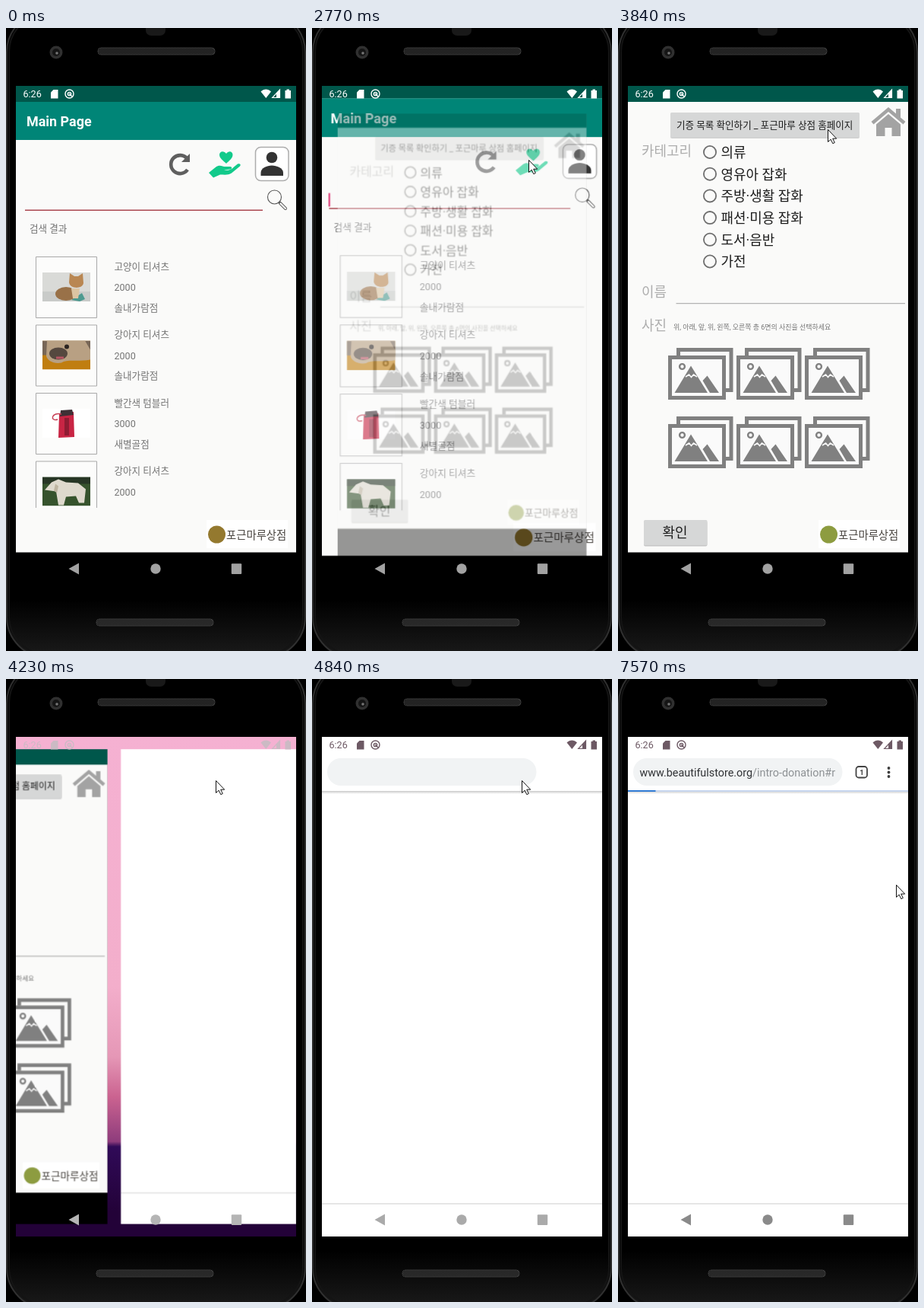
Recreate the animation shown at these times as an HTML page. Size 395 px wide and 818 px high, loop 8 s.

```html
<!DOCTYPE html>
<html lang="ko">
<head>
<meta charset="utf-8">
<title>Phone demo</title>
<style>
html, body { margin: 0; width: 100%; height: 100%; overflow: hidden; background: #000; }
svg { display: block; width: 395px; height: 818px; }
text { font: 12.57px Roboto, "Noto Sans CJK KR", "Noto Sans CJK", "Noto Sans", sans-serif; fill: #747474; white-space: pre; }
.big { font-size: 17.95px; }
.mid { font-size: 14.36px; }
.small { font-size: 8.97px; }
.dark { fill: #1c1c1c; }
.pale { fill: #adadad; }

.a { animation: 8s step-end infinite; }
.win { transform-origin: 197.5px 404px; }
.caret { animation-name: caret; }
.main { animation-name: main; }
.form { animation-name: form; }
.wall { animation-name: wall; }
.web { animation-name: web; }
.bar { animation-name: bar; }
.hint { animation-name: hint; }
.tools { animation-name: tools; }
.url { animation-name: url; }
.load { animation-name: load; transform-origin: 13px 0; }
.status { animation-name: status; }
.nav { animation-name: nav; }
.ripple { animation-name: ripple; transform-origin: 277px 134px; }
.lift { animation-name: lift; }
.mouse { animation-name: mouse; }

@keyframes caret {
  0%, 11.5%, 23.875% { opacity: 0; }
  4.625%, 18.125%, 30.75% { opacity: 1; }
}
@keyframes main {
  0% { transform: none; opacity: 1; }
  34.625% { transform: scale(1.015); opacity: 1; }
  35.563% { transform: scale(1.04); opacity: 1; }
  36.5% { transform: scale(1.047); opacity: 1; }
  37.438% { transform: scale(1.05); opacity: 1; }
  38.375%, 100% { opacity: 0; }
}
@keyframes form {
  0% { opacity: 0; transform: scale(.85); }
  34.625% { opacity: .4; transform: scale(.89); }
  35.563% { opacity: 1; transform: scale(.97); }
  36.5% { opacity: 1; transform: scale(.99); }
  37.438% { opacity: 1; transform: scale(.996); }
  38.375% { opacity: 1; transform: none; }
  51.875% { opacity: 1; transform: translate(-74px) scale(.97); }
  52.834% { opacity: 1; transform: translate(-239px) scale(.95); }
  53.79% { opacity: 1; transform: translate(-324px) scale(.95); }
  54.75% { opacity: 1; transform: translate(-353px) scale(.95); }
  55.625%, 100% { opacity: 0; }
}
@keyframes wall {
  0% { opacity: 0; }
  51.875%, 100% { opacity: 1; }
}
@keyframes web {
  0% { opacity: 0; }
  51.875% { opacity: 1; transform: translate(294px) scale(.97); }
  52.834% { opacity: 1; transform: translate(129px) scale(.95); }
  53.79% { opacity: 1; transform: translate(44px) scale(.95); }
  54.75% { opacity: 1; transform: translate(15px) scale(.95); }
  55.625% { opacity: 1; transform: translate(4px) scale(.957); }
  56.68% { opacity: 1; transform: scale(.987); }
  57.625%, 100% { opacity: 1; transform: none; }
}
@keyframes bar {
  0% { opacity: 0; }
  57.625%, 100% { opacity: 1; }
}
@keyframes hint {
  0% { opacity: 0; }
  66.75% { opacity: .5; }
  68.375% { opacity: 1; }
  90.77%, 100% { opacity: 0; }
}
@keyframes tools {
  0% { opacity: 0; }
  66.75% { opacity: .5; }
  68.375%, 100% { opacity: 1; }
}
@keyframes url {
  0% { opacity: 0; }
  90.77%, 100% { opacity: 1; }
}
@keyframes load {
  0% { transform: scaleX(0); }
  91.73% { transform: scaleX(.25); }
  92.7% { transform: scaleX(.5); }
  93.66% { transform: scaleX(.75); }
  94.625%, 100% { transform: none; }
}
@keyframes status {
  0% { color: #fff; }
  51.875% { color: #ccbac4; }
  53.79% { color: #b5a0ab; }
  55.625% { color: #947f8a; }
  57.625%, 100% { color: #6d5964; }
}
@keyframes nav {
  0% { color: #a2a2a2; }
  51.875% { color: #b5b5b5; }
  60.5% { color: #aaa; }
  61.5% { color: #a0a0a0; }
  62.5% { color: #969696; }
  63.5% { color: #8e8e8e; }
  73.25%, 100% { color: #8a8a8a; }
}
@keyframes ripple {
  0% { opacity: 0; transform: scale(.2); }
  45.125% { opacity: .1; transform: scale(.35); }
  46.083% { opacity: .1; transform: scale(.75); }
  47.04% { opacity: .06; transform: none; }
  48%, 100% { opacity: 0; }
}
@keyframes lift {
  0%, 48% { opacity: 0; }
  45.125% { opacity: .1; }
  46.083% { opacity: .16; }
  47.04% { opacity: .1; }
}
@keyframes mouse {
  0% { transform: translate(420px, 840px); }
  7.375% { transform: translate(385px, 776px); }
  8.36% { transform: translate(371px, 695px); }
  9.344% { transform: translate(353px, 590px); }
  10.328% { transform: translate(335px, 482px); }
  11.313% { transform: translate(318px, 382px); }
  12.297% { transform: translate(304px, 298px); }
  13.281% { transform: translate(294px, 232px); }
  14.266% { transform: translate(288px, 190px); }
  15.25% { transform: translate(285px, 173px); }
  40.5% { transform: translate(283px, 162px); }
  41.375% { transform: translate(279px, 143px); }
  42.25% { transform: translate(276px, 133px); }
  87.875% { transform: translate(281px, 141px); }
  88.84% { transform: translate(293px, 160px); }
  89.8% { transform: translate(310px, 187px); }
  90.77% { transform: translate(328px, 215px); }
  91.73% { transform: translate(344px, 240px); }
  92.7% { transform: translate(356px, 257px); }
  93.66% { transform: translate(363px, 266px); }
  94.625%, 100% { transform: translate(366px, 270px); }
}
</style>
</head>
<body>
<svg viewBox="0 0 395 818">
  <defs>
    <clipPath id="screen"><path d="M13 76h369v656H13z"/></clipPath>
    <clipPath id="list"><path d="M30 290h340v340H30z"/></clipPath>
    <clipPath id="button"><rect x="69" y="111" width="249" height="32.5" rx="1.5"/></clipPath>
    <clipPath id="pic"><path d="M48 321h63v38H48z"/></clipPath>
    <linearGradient id="body" x2="0" y2="1">
      <stop offset=".91" stop-color="#000"/><stop offset="1" stop-color="#1b1b1b"/>
    </linearGradient>
    <linearGradient id="sky" x2="0" y2="1">
      <stop offset="0" stop-color="#f5b1d2"/><stop offset=".5" stop-color="#f3aecb"/>
      <stop offset=".64" stop-color="#e597b6"/><stop offset=".72" stop-color="#cb6390"/>
      <stop offset=".81" stop-color="#8e3c7c"/><stop offset=".82" stop-color="#300a58"/>
      <stop offset=".95" stop-color="#230238"/>
    </linearGradient>
    <linearGradient id="shade" x2="0" y2="1">
      <stop stop-color="#c8c8c8"/><stop offset="1" stop-color="#fff"/>
    </linearGradient>
    <pattern id="mesh" width="2" height="2" patternUnits="userSpaceOnUse">
      <path d="M0 0h1v1H0zM1 1h1v1H1z" fill="#464646"/>
    </pattern>
    <rect id="grille" width="154" height="9" rx="4" fill="url(#mesh)" stroke="#383838"/>
    <circle id="radio" cx="121" cy="163" r="8.1" fill="none" stroke="#6e6e6e" stroke-width="1.8"/>
    <g id="photo" fill="none" stroke="#808080" stroke-width="5">
      <path d="M13.5 11V3.500h69.500v53H74"/>
      <path fill="#fafafa" d="M2.500 13.500h71v53h-71z"/>
      <circle cx="18.500" cy="25.500" r="3.400" stroke-width="2.400"/>
      <path d="M8.500 60 30 24.500 52 60zM45.500 44l6-6.500L67 60H55z" fill="#808080" stroke="none"/>
      <path d="m23 39 4.500-3 3 3.500 3-3.500 4.500 3" stroke="#fafafa" stroke-width="1.600"/>
    </g>
    <path id="frame" d="M39.500 300.500h80v80h-80z" fill="#fcfcfb" stroke="#a9a9a9"/>
    <g id="sign">
      <path d="M264 646h107v37H264z" fill="#fff"/>
      <circle cx="277.500" cy="665" r="11.500" fill="currentColor"/>
      <text class="mid" x="290" y="670.500" style="fill:#494540">포근마루상점</text>
    </g>
    <g id="base">
      <path d="M13 76h369v656H13z"/>
      <path d="M13 76h369v612.500H13z" fill="#fafaf9"/>
      <path d="M13 76h369v21H13z" fill="#00574b"/>
    </g>
  </defs>

  <!-- phone -->
  <path d="M0 0h395v818H0z"/>
  <rect x="1" y="-22" width="393" height="849" rx="54" fill="url(#body)" stroke="#303030" stroke-width="2"/>
  <rect x="4" y="-19" width="387" height="842" rx="51" fill="none" stroke="#141414" stroke-width="2"/>
  <rect x="184" y="-8" width="26" height="18" rx="7" fill="#191919"/>
  <circle cx="66" cy="32" r="8.500" fill="#303030"/>
  <circle cx="66" cy="32" r="5" fill="#151515"/>
  <circle cx="67" cy="33" r="1.800" fill="#777"/>
  <use href="#grille" x="121" y="26"/>
  <use href="#grille" x="119" y="776"/>

  <g clip-path="url(#screen)">
    <path d="M13 76h369v656H13z"/>
    <path class="a wall" d="M13 76h369v656H13z" fill="url(#sky)"/>

    <!-- list page -->
    <g class="a win main">
      <use href="#base"/>
      <path d="M13 97h369v50H13z" fill="#008577"/>
      <text class="big" x="27" y="129" style="fill:#fff;font-weight:600">Main Page</text>
      <path d="M238.500 171.500a12 12 0 1 0 .5 14.500" fill="none" stroke="#5f5f5f" stroke-width="4.600"/>
      <path d="M242 165v11h-11z" fill="#5f5f5f"/>
      <g fill="#12ca8b">
        <path d="M290 178c-4-4-9-7-9-11.500 0-5 6-6 9-1.500 3-4.500 8.500-3.500 8.500 1.500 0 4.500-4.500 7.500-8.500 11.500z"/>
        <path d="m267 190 10-8c5-3 8 0 12 0h6c3 0 3 3 0 3.500l-8 1c7 1 10-1 13-4l5-4c2-1 5 0 3 3l-11 9c-4 3-10 2-15 2l-9 4z"/>
      </g>
      <rect x="328.500" y="156.500" width="43.500" height="44" rx="7" fill="#fff" stroke="#adadad" stroke-width="1.500"/>
      <circle cx="350" cy="170" r="7.300" fill="#333"/>
      <path d="M335.500 194v-4c0-6 8-9.500 14.500-9.500s15 3.500 15 9.500v4z" fill="#333"/>
      <g fill="none" stroke="#555">
        <circle cx="353.500" cy="222" r="9" stroke-width="1.100"/>
        <path d="m360.500 229.500 7.500 7.500" stroke-width="4" stroke-linecap="round"/>
        <path d="m361.500 230.500 6.500 6.500" stroke="#fafafa" stroke-width="2.300" stroke-linecap="round"/>
      </g>
      <path d="M25 239.200h313" stroke="#ab4750" stroke-width="1.500"/>
      <path class="a caret" d="M24.500 219.500h1.800v17.500h-1.800z" fill="#d81b60"/>
      <text x="31" y="268">검색 결과</text>

      <g clip-path="url(#list)">
        <g>
          <use href="#frame"/>
          <g clip-path="url(#pic)">
            <path d="M48 321h63v38H48z" fill="#d9dad7"/>
            <path d="M48 346h63v13H48z" fill="#c9cbc9"/>
            <path d="m86 357 14-9 4 8-7 3z" fill="#4d9a90"/>
            <ellipse cx="79" cy="349" rx="14" ry="9" fill="#997148"/>
            <path d="m83 334 1-12 6 4h5l6-4 1 13c-1 8-18 8-19-1z" fill="#b98752"/>
            <path d="M86 342h11l-2 13h-7z" fill="#dcc5a2"/>
          </g>
          <text x="142.500" y="317.500">고양이 티셔츠</text>
          <text x="142.500" y="345">2000</text>
          <text x="142.500" y="371.500">솔내가람점</text>
        </g>
        <g transform="translate(0 89.500)">
          <use href="#frame"/>
          <g clip-path="url(#pic)">
            <path d="M48 321h63v38H48z" fill="#c07e10"/>
            <path d="M48 321h63v19H48z" fill="#776657"/>
            <path d="M54 321h50l7 12v13c-18 3-31-1-38 4-10 2-19-3-20-9z" fill="#b8a083"/>
            <ellipse cx="69" cy="338" rx="12" ry="8" fill="#55483f"/>
            <path d="M66 342h10v3H66z" fill="#b65563"/>
            <circle cx="80" cy="329" r="3" fill="#2c2522"/>
          </g>
          <text x="142.500" y="317.500">강아지 티셔츠</text>
          <text x="142.500" y="345">2000</text>
          <text x="142.500" y="371.500">솔내가람점</text>
        </g>
        <g transform="translate(0 179)">
          <use href="#frame"/>
          <path d="M48 321h63v38H48z" fill="#fff"/>
          <path d="m70 327 19-2 1 33-21 1z" fill="#c82544"/>
          <path d="m72 323 15-1 2 7-18 2z" fill="#3e3035"/>
          <path d="M77 333h6v23h-6z" fill="#8f1c33"/>
          <path d="M73 328c-14-3-15 10-5 7" fill="none" stroke="#c84257" stroke-width="1.500"/>
          <text x="142.500" y="317.500">빨간색 텀블러</text>
          <text x="142.500" y="345">3000</text>
          <text x="142.500" y="371.500">새별골점</text>
        </g>
        <g transform="translate(0 268.500)">
          <use href="#frame"/>
          <g clip-path="url(#pic)">
            <path d="M48 321h63v38H48z" fill="#36532d"/>
            <path d="M48 321h63v9H48z" fill="#273625"/>
            <path d="m60 328 9-4 10 4 16 1 10 8-2 18h-7l-4-9-13 1-3 11h-7l-3-18-15-2z" fill="#ded9cd"/>
            <path d="m65 330 4 3-2 9-4-3z" fill="#beb5a1"/>
          </g>
          <text x="142.500" y="317.500">강아지 티셔츠</text>
          <text x="142.500" y="345">2000</text>
        </g>
      </g>
      <use href="#sign" color="#94792f"/>
    </g>

    <!-- donation form -->
    <g class="a win form">
      <use href="#base"/>
      <rect class="a lift" x="70" y="114" width="248" height="34" rx="3"/>
      <rect x="69" y="112" width="249" height="33" rx="2" fill="#d0d0d0"/>
      <rect x="69" y="111" width="249" height="32.500" rx="1.500" fill="#d6d7d7"/>
      <g clip-path="url(#button)"><circle class="a ripple" cx="277" cy="134" r="215"/></g>
      <text class="dark" x="77" y="131.800">기증 목록 확인하기 _ 포근마루 상점 홈페이지</text>
      <g fill="#a3a3a3">
        <path d="m356 104 22.500 19-3 3.500L356 110l-19.500 16.500-3-3.500z"/>
        <path d="M366 106h6v13l-6-5zM356 113l16 13.500V142h-11.500v-11h-9v11H340v-15.500z"/>
      </g>
      <text class="big pale" x="31" y="168">카테고리</text>
      <use href="#radio"/><use href="#radio" y="28.700"/><use href="#radio" y="57.400"/>
      <use href="#radio" y="86.100"/><use href="#radio" y="114.800"/><use href="#radio" y="143.500"/>
      <text class="big dark" x="135.500" y="169.800">의류</text>
      <text class="big dark" x="135.500" y="198.500">영유아 잡화</text>
      <text class="big dark" x="135.500" y="227.200">주방·생활 잡화</text>
      <text class="big dark" x="135.500" y="255.900">패션·미용 잡화</text>
      <text class="big dark" x="135.500" y="284.600">도서·음반</text>
      <text class="big dark" x="135.500" y="313.300">가전</text>
      <text class="big pale" x="31" y="352.500">이름</text>
      <path d="M76.500 361.700H378" stroke="#b3b3b3" stroke-width="1.300"/>
      <text class="big pale" x="31" y="396.500">사진</text>
      <text class="small" x="73" y="396">위, 아래, 앞, 위, 왼쪽, 오른쪽 총 6면의 사진을 선택하세요</text>
      <use href="#photo" x="66" y="419"/><use href="#photo" x="156" y="419"/><use href="#photo" x="246" y="419"/>
      <use href="#photo" x="66" y="509"/><use href="#photo" x="156" y="509"/><use href="#photo" x="246" y="509"/>
      <rect x="34" y="647.500" width="83.500" height="33" rx="2" fill="#c6c6c6"/>
      <rect x="34" y="646" width="83.500" height="33" rx="1.500" fill="#d6d7d7"/>
      <text class="big dark" x="58.500" y="669">확인</text>
      <use href="#sign" color="#8d9c40"/>
    </g>

    <!-- browser -->
    <g class="a win web">
      <path d="M13 76h369v656H13z" fill="#fff"/>
      <path d="M13 689h369" stroke="#dedede" stroke-width="1.300"/>
      <g class="a bar">
        <path d="M13 147h369v4H13z" fill="url(#shade)"/>
        <rect x="20" y="104" width="275.500" height="36" rx="18" fill="#f1f3f4"/>
      </g>
      <text class="a hint mid" x="28.500" y="127.500" style="fill:#6b6f72">웹 주소 검색 또는 입력</text>
      <g class="a tools">
        <rect x="313.500" y="115" width="14.500" height="14.500" rx="3.500" fill="none" stroke="#444" stroke-width="1.800"/>
        <g fill="#3f3f3f"><circle cx="356.500" cy="117" r="1.900"/><circle cx="356.500" cy="122.500" r="1.900"/><circle cx="356.500" cy="128" r="1.900"/></g>
      </g>
      <g class="a url">
        <text class="mid" x="28.500" y="128" style="fill:#303235">www.beautifulstore.org<tspan fill="#8d9194">/intro-donation#r</tspan></text>
        <text x="318.300" y="125.700" style="font-size:9.500px;font-weight:700;fill:#444">1</text>
        <path d="M13 146h369v2H13z" fill="#c7d6ef"/>
        <path class="a load" d="M13 146h36.500v2H13z" fill="#317cd5"/>
      </g>
    </g>

    <!-- system icons -->
    <g class="a status" fill="currentColor">
      <text x="22.500" y="91.300" style="fill:currentColor">6:26</text>
      <path d="M62.500 81h6v11.500H59V84.500z"/>
      <g fill="none" stroke="currentColor">
        <circle cx="83.500" cy="86.500" r="5.500" stroke-width="1.400"/>
        <circle cx="83.500" cy="86.500" r="2.200" stroke-width="1.300"/>
        <path d="m83 86 4 4" stroke-width="1.500"/>
        <path d="M360.500 81v10.500H350.700z" stroke-width="1.200"/>
      </g>
      <path d="M335.500 83.500c4-4 9.500-4 13.500 0l-6.700 8.500zM356 91.500v-6l5-5v11z"/>
      <path d="M367.500 82h2v-1.500h3.500V82h2v10.500h-7.500z"/>
    </g>
    <g class="a nav" fill="currentColor">
      <path d="M82.500 710 96 702.500v15z"/>
      <circle cx="197" cy="710" r="6.700"/>
      <rect x="296.800" y="703.300" width="13.400" height="13.600" rx="1"/>
    </g>
  </g>

  <path class="a mouse" d="M.5.500v16l3.700-3.300 2.600 5.500 2.500-1.200-2.600-5.300h5z" fill="#fff" stroke="#111"/>
</svg>
</body>
</html>
```
